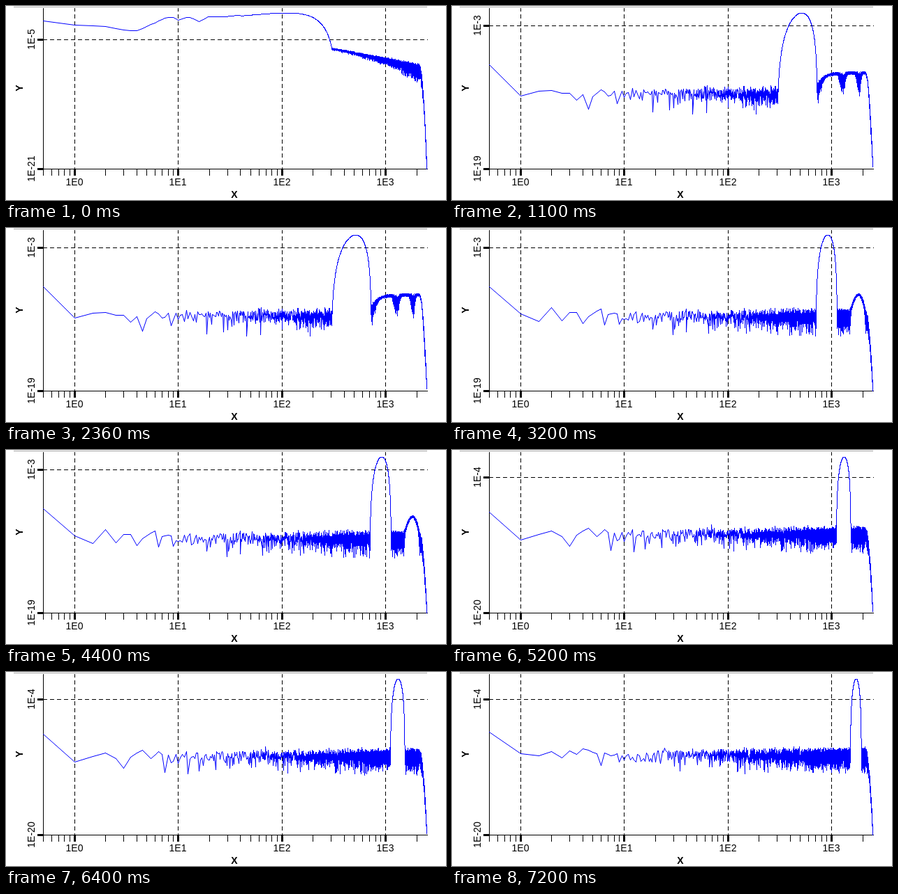
Write an HTML page with a canvas that moves like this. It is 630 px wide and 279 px high and loops after 8000 ms.

```html
<!DOCTYPE html>
<html>
<head>
<meta charset="utf-8">
<title>Log-log spectrum</title>
<style>
html, body { margin: 0; width: 100%; height: 100%; overflow: hidden; background: #fff; }
svg, canvas { position: absolute; left: 0; top: 0; }
text { font: 14px "Liberation Sans", Arial, sans-serif; text-anchor: middle; }
.bold { font-weight: bold; }
path { fill: none; stroke: #000; shape-rendering: crispEdges; }
.dash { stroke-dasharray: 6 4; stroke-dashoffset: .5; }
.thick { stroke-width: 3; }
.frame { stroke: #a9a9a9; }
</style>
</head>
<body>
<svg id="chart" width="630" height="279"></svg>
<canvas id="plot" width="630" height="279"></canvas>
<script>
const LEFT = 53, RIGHT = 603, BASE = 234, DECADE = 148.5, LOOP = 8000, NYQUIST = 2500;
const toX = f => 98 + DECADE * Math.log10(f);

// Noise floors: frequency => [top of the band, usual depth]
const flat = (top, depth) => () => [top, depth];

function sloping(f) {
  const t = (toX(f) - 468) / 120;
  return [60 + 21 * t, 4 + 18 * t * t];
}

function twoLobes(f) {
  if (f < 730) return [114, 32];
  const notch = Math.cos(Math.PI * (f - 720) / 560) ** 8;
  return [94 + 13 * Math.exp((730 - f) / 150), 4 + 28 * notch];
}

function oneLobe(f) {
  const u = (f - 1820) / 300, top = 94.5 + 20 * u * u;
  return top < 114 ? [top, 3 + 10 * u * u] : [114, 32];
}

// head: [frequency, y] key points of the curve's first stretch
const states = [
  { start: 0, grid: 48, labels: ["1E-5", "1E-21"], steep: 97, width: 229, floor: sloping,
    head: [[.5, 21.5], [1, 27], [2, 29.5], [3, 34.5], [4, 35.5], [6, 24], [8, 16], [9, 16],
      [10, 20.5], [12.5, 16], [16, 22], [20, 15], [30, 15], [40, 13]] },
  { start: 1100, grid: 28, labels: ["1E-3", "1E-19"], steep: 97, floor: twoLobes,
    head: [[.5, 84], [1, 129], [1.5, 122.5], [2, 121.5], [2.5, 125.5], [3, 125.5], [3.5, 135],
      [4, 127.5], [4.5, 148.5], [5, 130], [6, 120.5]] },
  { start: 3200, grid: 28, labels: ["1E-3", "1E-19"], steep: 97, floor: oneLobe,
    head: [[.5, 84], [1, 123], [1.5, 134.5], [2, 114.5], [2.5, 133.5], [3, 121.5], [3.5, 121.5],
      [4, 137], [4.5, 127.5], [6, 116.5], [6.5, 139.5]] },
  { start: 5200, grid: 39, labels: ["1E-4", "1E-20"], steep: 92, floor: flat(108.5, 30.5),
    head: [[.5, 89], [1, 129], [2, 116.5], [2.5, 124], [3, 138], [3.5, 122], [4.5, 112.5],
      [5.5, 124.5], [6.5, 114], [7, 118], [7.5, 144]] },
  { start: 7200, grid: 39, labels: ["1E-4", "1E-20"], steep: 92, floor: flat(107, 30.5),
    head: [[.5, 86], [1, 117.5], [1.5, 120.5], [2, 114.5], [2.5, 123.5], [3, 113], [3.5, 118],
      [4, 110.5], [5.5, 117], [6, 134], [6.5, 116]] }
];

function seeded(seed) {
  return () => (seed = (seed * 16807) % 2147483647) / 2147483647;
}

// Log of exponentially distributed power: 0 is the band's top, 1 its usual bottom
const noise = random => (0.9 - Math.log10(0.004 - Math.log(random()))) / 2.5;

function along(points, f) {
  const i = points.findIndex(p => p[0] >= f);
  const [fb, b] = points[i], [fa, a] = points[Math.max(0, i - 1)];
  return fa === fb ? b : a + (b - a) * Math.log(f / fa) / Math.log(fb / fa);
}

function level({ steep, width = 218, head, floor }, index, f, random) {
  if (f <= head.at(-1)[0]) return along(head, f);
  const [top, depth] = floor(f);
  const fall = Math.max(0, (f - 2100) / (NYQUIST - 2100));
  const y = top + (230 - top) * fall ** 2 + depth * (1 - 0.8 * fall) * noise(random);
  const u = (f - 112 - 404 * index) / width;
  return Math.abs(u) < 1 ? Math.min(y, 10 - steep * Math.log10(1 - u * u)) : y;
}

function drawCurve(state, index) {
  const ctx = plot.getContext("2d"), random = seeded(7919 * (index + 3));
  ctx.clearRect(0, 0, plot.width, plot.height);
  ctx.strokeStyle = "#00f";
  ctx.lineCap = "square";
  let last;
  for (let f = 0.5; f <= NYQUIST; f += 0.5) {
    const y = Math.min(BASE, level(state, index, f, random));
    const point = [toX(f), y].map(v => Math.floor(v) + 0.5);
    // Separate strokes on whole pixels: dense stretches build up solid colour
    if (last && String(last) !== String(point)) {
      ctx.beginPath();
      ctx.moveTo(...last);
      ctx.lineTo(...point);
      ctx.stroke();
    }
    last = point;
  }
}

const line = (d, cls = "") => `<path class="${cls}" transform="translate(.5 .5)" d="${d}"/>`;
const sideText = (x, y, s, cls = "") =>
  `<text class="${cls}" transform="translate(${x} ${y}) rotate(-90)">${s}</text>`;

function axes() {
  let out = line("M10 .5H602", "frame") + line(`M${LEFT} 2V${BASE}H${RIGHT}`) +
    line(`M44 ${BASE}H${LEFT}`, "thick");
  for (let d = -1; d <= 3; d++) {
    for (let m = 1; m <= 9; m++) {
      const f = m * 10 ** d, x = Math.floor(toX(f) + 0.05);
      if (f < 0.5 || f > NYQUIST) continue;
      out += line(`M${x} ${BASE}V243`, m === 1 ? "thick" : "");
      if (m === 1) out += line(`M${x} 2V${BASE}`, "dash") + `<text x="${x}" y="258">1E${d}</text>`;
    }
  }
  return out + '<text class="bold" x="327" y="276">X</text>' + sideText(24, 118, "Y", "bold");
}

function scale({ grid, labels }) {
  return line(`M${LEFT} ${grid}H${RIGHT}`, "dash") + line(`M44 ${grid}H${LEFT}`, "thick") +
    sideText(41, grid, labels[0]) + sideText(41, BASE, labels[1]);
}

const begin = performance.now();
let shown = -1;

function tick() {
  const t = (performance.now() - begin) % LOOP;
  const now = states.findLastIndex(s => s.start <= t);
  if (now !== shown) {
    chart.innerHTML = axes() + scale(states[now]);
    drawCurve(states[now], now);
    shown = now;
  }
  requestAnimationFrame(tick);
}
tick();
</script>
</body>
</html>
```
